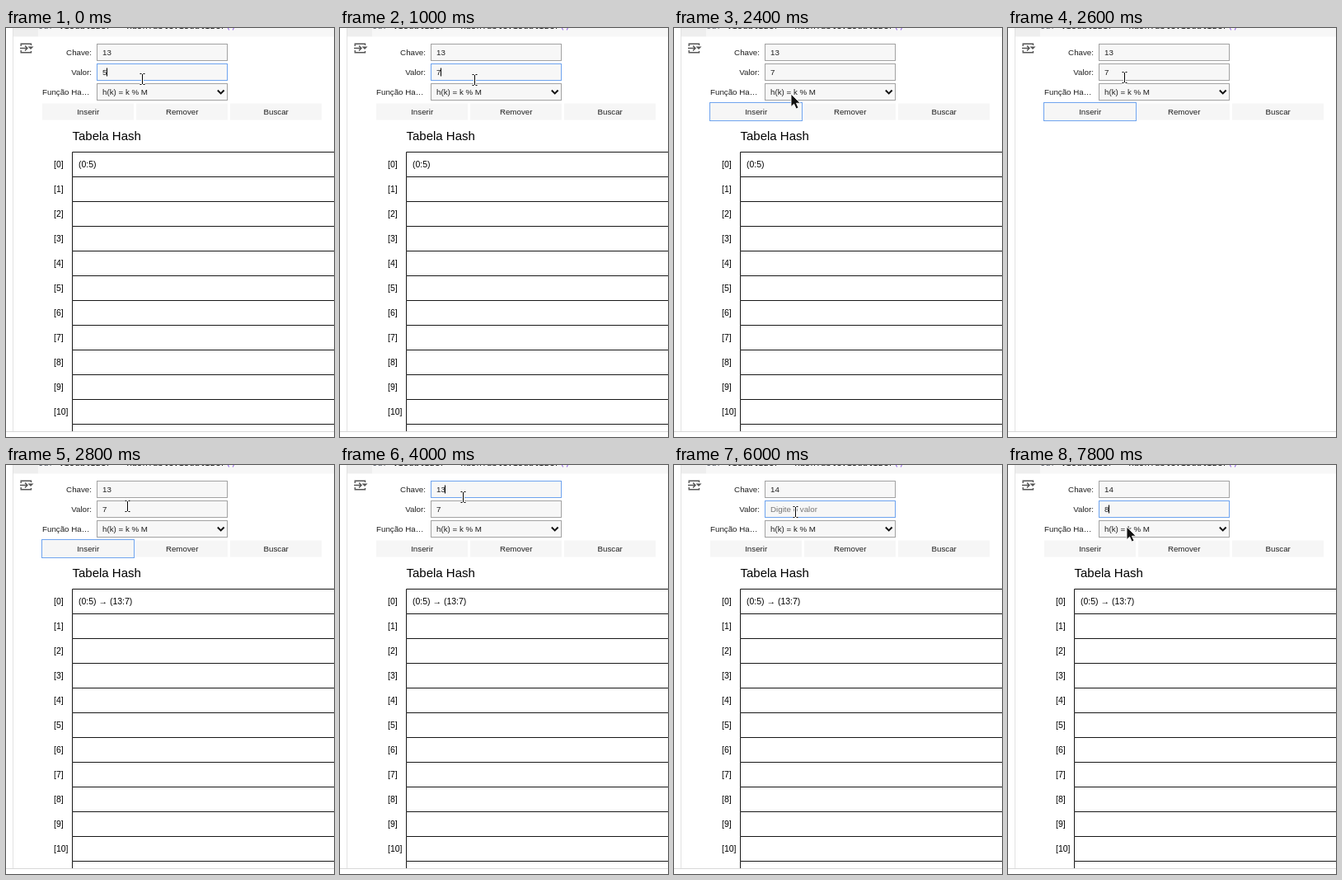
Recreate the animation shown at these times as an HTML page. Size 398 by 496 pixels, loop 8 s.

```html
<!DOCTYPE html>
<html lang="pt">
<head>
<meta charset="utf-8">
<title>Tabela Hash</title>
<style>
  html, body { margin: 0; width: 100%; height: 100%; overflow: hidden; background: #fff; }
  svg { display: block; width: 398px; height: 496px; }
  text { font: 9.75px "Liberation Sans", Arial, sans-serif; fill: #1f1f1f; white-space: pre; }
  .cell { font-size: 10.5px; fill: #000; }
  .title { font-size: 15px; fill: #000; }
  .code { font: 10.5px "DejaVu Sans Mono", monospace; fill: #111; }
  .field { fill: #f7f7f7; stroke: #a2a2a2; }
  .field.focus { stroke: #6ea3ee; }
  .hint { fill: #757575; }
</style>
</head>
<body>
<svg viewBox="0 0 398 496">
  <defs>
    <filter id="lift" x="-10%" y="-50%" width="120%" height="220%">
      <feDropShadow dx="0" dy="1.2" stdDeviation="1" flood-opacity=".38"/>
    </filter>
    <clipPath id="output"><path d="M0 0H398V489H0Z"/></clipPath>
  </defs>
  <path d="M9 0H39V10.5H9Z" fill="#eee"/>
  <path d="M39 0H398V10.5H39Z" fill="#f7f7f7"/>
  <text class="code" x="39" y="1"><tspan fill="#555a66">our</tspan> visualizer = HashTableVisualizer<tspan fill="#7a3ee0">()</tspan></text>
  <path d="M8.5 0V489" stroke="#e2e2e2"/>
  <path d="M0 489.5H398" stroke="#d8d8d8"/>
  <g fill="none" stroke="#555" stroke-width="1.4">
    <path d="M18.2 22V19.2H30.5V21M18.2 27V29.8H30.5V28M17 24.5H26M23 21.5L26 24.5L23 27.5"/>
    <path d="M26.5 22.5H33.5L30 26Z" fill="#555" stroke="none"/>
  </g>
  <g id="form"></g>
  <path d="M256.8 75.5L260.7 79.4L264.6 75.5" fill="none" stroke="#111" stroke-width="1.9"/>
  <g id="table" clip-path="url(#output)"></g>
  <path id="caret" stroke="#000" d="M0 0V10"/>
  <g id="mouse">
    <g id="beam" fill="none">
      <path d="M-3 -6.5H3M-3 6.5H3M0 -6V6" stroke="#fff" stroke-width="3"/>
      <path d="M-3 -6.5H-1M1 -6.5H3M-3 6.5H-1M1 6.5H3M0 -6V6" stroke="#000"/>
    </g>
    <path id="arrow" d="M0 0V15.5L3.6 12.2L6.2 18L9 16.8L6.5 11.2H11.3Z" fill="#111" stroke="#fff" stroke-width=".9"/>
    <path id="hand" d="M-3 0Q-1.6 -1.6 -.4 0V5.2Q1.4 4 2.6 5.6Q4.3 4.7 5.3 6.2Q7.4 5.6 7.8 7.6V11Q7.6 13.6 6.4 16H-1.4L-5.6 10.2Q-6 8.3 -4.2 8.5L-3 9.6Z" fill="#fff" stroke="#111" stroke-width="1.2" stroke-linejoin="round"/>
  </g>
</svg>
<script>
const LOOP = 8000, STEP = 200;
const byId = id => document.getElementById(id);

function add(parent, tag, attrs, content = "") {
  const el = document.createElementNS("http://www.w3.org/2000/svg", tag);
  for (const key in attrs) el.setAttribute(key, attrs[key]);
  el.textContent = content;
  return byId(parent).appendChild(el);
}
const label = (parent, x, y, content, cls = "", anchor = "start") =>
  add(parent, "text", { x, y, class: cls, "text-anchor": anchor }, content);
const field = y => add("form", "rect", { x: 110.5, y, width: 158, height: 20, class: "field" });

const keyBox = field(19.5), valueBox = field(43.5);
field(67.5);
label("form", 104, 33, "Chave:", "", "end");
label("form", 104, 57, "Valor:", "", "end");
label("form", 44, 81, "Função Ha…");
const keyText = label("form", 117, 33, "");
const valueText = label("form", 117, 57, "");
label("form", 117, 81, "h(k) = k % M");

const buttons = ["Inserir", "Remover", "Buscar"].map((name, i) => {
  const box = add("form", "rect", { x: 44 + 114 * i, y: 91.5, width: 111, height: 20, fill: "#f6f6f6" });
  label("form", 99.7 + 114 * i, 105, name, "", "middle");
  return box;
});
const ring = add("form", "rect", { x: 43.5, y: 90.5, width: 112, height: 22, fill: "none", stroke: "#6ea3ee" });

label("table", 80.5, 136, "Tabela Hash", "title");
for (let i = 0; i < 12; i++) {
  const y = 150.5 + 30 * i;
  add("table", "path", { d: `M400 ${y}H80.5V${y + 30}`, fill: "none", stroke: "#181818" });
  if (i < 11) label("table", 58, y + 18.5, `[${i}]`, "cell");
}
const bucket = label("table", 88, 169, "", "cell");

// [time, value], each held until the next one
const keys = [[0, "13"], [4200, "1"], [4600, "14"]];
const values = [[0, "5"], [400, ""], [600, "7"], [5600, ""], [7600, "8"]];
const focuses = [[0, "value"], [2000, "button"], [4000, "key"], [5400, "value"]];
const carets = [[0, true], [1200, false], [4000, true], [6000, false], [6600, true], [7200, false], [7600, true]];
const tables = [[0, "(0:5)"], [2600, ""], [2800, "(0:5) → (13:7)"]];
const moves = [
  [0, [165.5, 62]], [1000, [163.5, 63]], [1200, [158, 77]], [1400, [150, 99]], [1600, [145, 113]],
  [1800, [144, 101]], [2400, [142, 80]], [2600, [141.5, 60]], [2800, [147.5, 50]], [3000, [151.5, 43]],
  [3200, [156.5, 52]], [3600, [149.5, 39]], [4800, [150.5, 49]], [5000, [149.5, 58]],
  [5400, [147.5, 57]], [7800, [144, 75]]
];
const at = (track, t) => track.findLast(entry => entry[0] <= t)[1];
const show = (el, on) => el.setAttribute("visibility", on ? "visible" : "hidden");

function pointerFor(y) {
  if (y < 40 || (y >= 43 && y < 65)) return "beam";
  return y > 91 && y < 112 ? "hand" : "arrow";
}

function render(time) {
  const t = Math.floor((time % LOOP) / STEP) * STEP;
  const key = at(keys, t), value = at(values, t), focus = at(focuses, t);
  const content = at(tables, t), [x, y] = at(moves, t), pointer = pointerFor(y);

  keyText.textContent = key;
  valueText.textContent = value || "Digite o valor";
  valueText.setAttribute("class", value ? "" : "hint");
  keyBox.classList.toggle("focus", focus === "key");
  valueBox.classList.toggle("focus", focus === "value");
  show(ring, focus === "button");
  buttons[0].setAttribute("filter", pointer === "hand" && focus !== "button" ? "url(#lift)" : "none");

  const typed = focus === "key" ? key : value;
  const caretX = Math.floor(117 + typed.length * 5.42) + .5;
  byId("caret").setAttribute("transform", `translate(${caretX} ${focus === "key" ? 24.5 : 48.5})`);
  show(byId("caret"), focus !== "button" && at(carets, t));

  show(byId("table"), content !== "");
  bucket.textContent = content;

  byId("mouse").setAttribute("transform", `translate(${x} ${y})`);
  for (const shape of ["beam", "arrow", "hand"]) show(byId(shape), shape === pointer);
}

const start = performance.now();
function tick() {
  render(performance.now() - start);
  requestAnimationFrame(tick);
}
tick();
</script>
</body>
</html>
```
